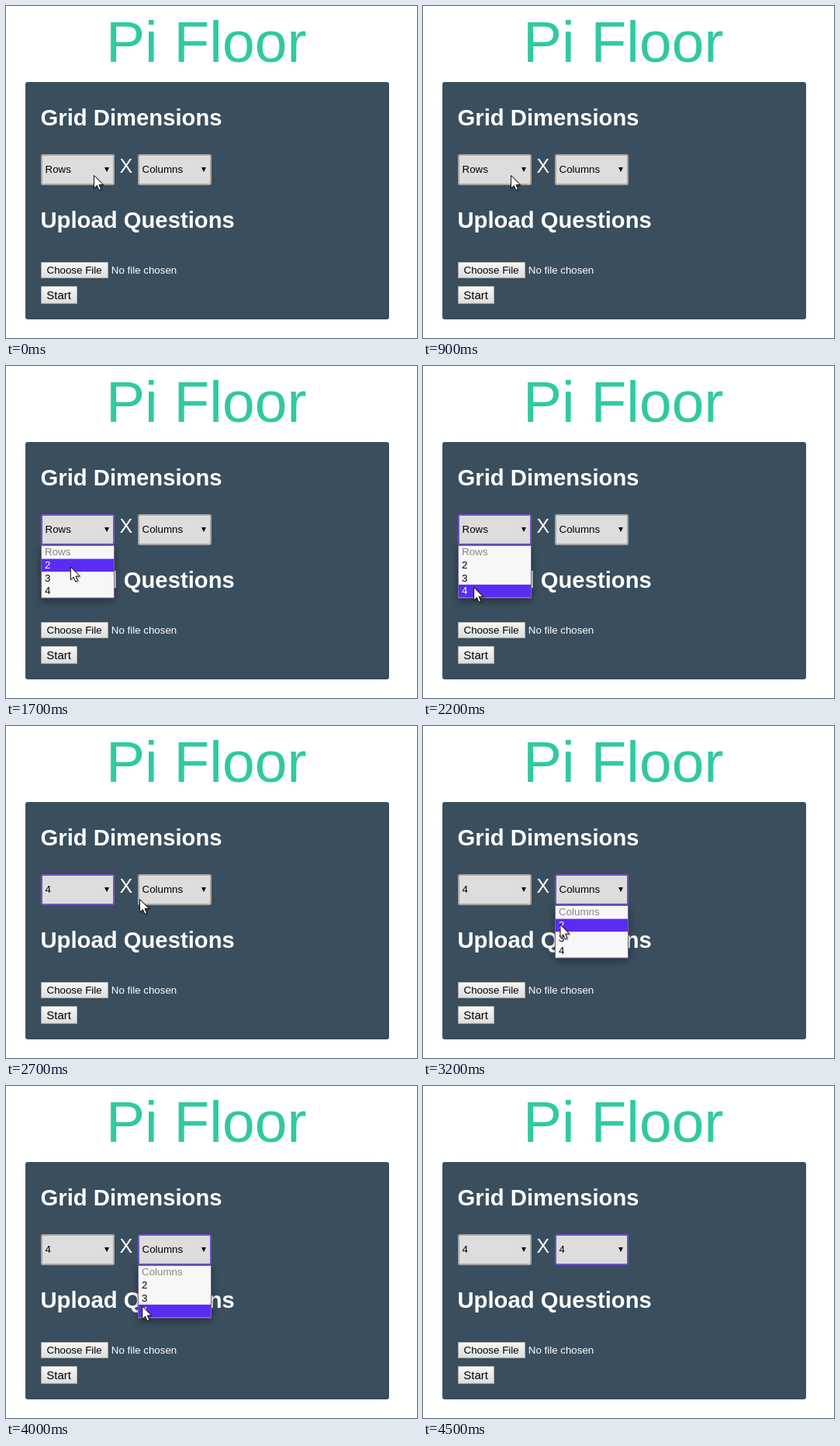
An HTML page that plays this animation: 530 by 428 pixels, repeating every 4900 ms.

```html
<!DOCTYPE html>
<html lang="en">
<head>
<meta charset="utf-8">
<title>Pi Floor</title>
<style>
html, body { margin: 0; width: 100%; height: 100%; overflow: hidden; background: #fff; }
svg { display: block; font: 13.33px "Liberation Sans", Arial, sans-serif; }
.title { font-size: 75px; fill: #30c9a0; }
.head { font-size: 29.25px; font-weight: bold; fill: #fff; }
.light { fill: #fff; }
.box { fill: #ddd; stroke: #a6a6a6; stroke-width: 2; }
.focus .box { stroke: #7253c4; }
.button { fill: url(#shade); stroke: #a9a9a9; }
.list { fill: #f7f7f7; stroke: #75669c; }
.menu { filter: drop-shadow(0 3px 5px rgba(0, 0, 0, .4)); }
</style>
</head>
<body>
<svg width="530" height="428" viewBox="0 0 530 428">
  <defs>
    <linearGradient id="shade" x2="0" y2="1">
      <stop stop-color="#f8f8f8"/><stop offset="1" stop-color="#dcdcdc"/>
    </linearGradient>
  </defs>
  <text class="title" x="129" y="72">Pi Floor</text>
  <rect x="25" y="98" width="469" height="306" rx="3" fill="#3a4e5d"/>
  <text class="head" x="44.5" y="154">Grid Dimensions</text>
  <text class="light" x="146.5" y="215" font-size="25">X</text>
  <text class="head" x="44.5" y="286">Upload Questions</text>
  <rect class="button" x="45.5" y="330.5" width="86" height="20"/>
  <text x="52.5" y="345">Choose File</text>
  <text class="light" x="135.8" y="345">No file chosen</text>
  <rect class="button" x="45.5" y="361.5" width="46" height="22"/>
  <text x="52.3" y="378" font-size="15">Start</text>
  <g id="selects"></g>
  <path id="cursor" d="M0 0V16.5l3.8-3.6 2.6 6 2.7-1.1-2.6-5.8h5.4z" fill="#fff" stroke="#111" stroke-linejoin="round"
    style="filter:drop-shadow(1px 1px 1px rgba(0,0,0,.35))"/>
</svg>
<script>
const LOOP = 4900, STEP = 100, ROW = 16.6, TOP = 232;
const selects = [
  { x: 45, name: 'Rows', open: 1100, close: 2400, blur: 2900 },
  { x: 170, name: 'Columns', open: 2900, close: 4100, blur: LOOP }
];
// time, x, y of the pointer tip
const path = [
  [0, 113.5, 218.5], [1000, 113.5, 218.5], [1100, 114.5, 213], [1300, 114.5, 213],
  [1600, 92, 246], [1900, 66, 285], [2300, 65.5, 285.5], [2400, 72, 280],
  [2700, 172.5, 223.5], [2900, 178, 216], [3200, 177, 256], [3600, 174, 275],
  [3800, 175, 284], [4300, 177, 284], [4400, 253, 346]
];

const pointer = t => {
  const i = path.findIndex(p => p[0] >= t);
  if (i < 1) return path[0].slice(1);
  const [a, b] = [path[i - 1], path[i]], k = (t - a[0]) / (b[0] - a[0]);
  return [1, 2].map(n => a[n] + (b[n] - a[n]) * k);
};

const text = (x, y, label, fill = '#000') => `<text x="${x}" y="${y}" fill="${fill}">${label}</text>`;

function menu({ x, name }, tipY) {
  const hover = Math.max(0, Math.min(3, Math.floor((tipY - TOP) / ROW)));
  const items = [name, 2, 3, 4].map((label, i) => {
    const y = TOP + i * ROW, on = i === hover;
    const bar = i ? '#5a2cf4' : '#c8c8c8';
    // the disabled first row is shaded only while the pointer is over the box itself
    const shown = on && (i || tipY < TOP);
    return (shown ? `<rect x="${x + 1}" y="${y}" width="93" height="${ROW}" fill="${bar}"/>` : '') +
      text(x + 5, y + 12.3, label, i ? (on ? '#fff' : '#000') : '#868686');
  });
  return `<g class="menu"><rect class="list" x="${x + .5}" y="231.5" width="94" height="67.5"/>${items.join('')}</g>`;
}

function select(s, t, tipY) {
  const { x, name, open, close, blur } = s;
  return `<g class="${t >= open && t < blur ? 'focus' : ''}">
    <rect class="box" x="${x + 1}" y="192" width="93" height="38" rx="1.5"/>
    ${text(x + 5.5, 215, t >= close ? 4 : name)}
    <path d="M${x + 82} 208h6l-3 6z"/></g>` + (t >= open && t < close ? menu(s, tipY) : '');
}

const box = document.getElementById('selects'), cursor = document.getElementById('cursor');
let last = -1;

function draw(now) {
  const t = Math.floor(now % LOOP / STEP) * STEP;
  if (t !== last) {
    last = t;
    const gone = t > 4400, [x, y] = pointer(Math.min(t, 4400));
    box.innerHTML = selects.map(s => select(s, t, y)).join('');
    cursor.setAttribute('transform', `translate(${x} ${y})`);
    cursor.setAttribute('visibility', gone ? 'hidden' : 'visible');
  }
}

const start = performance.now();
function tick() {
  draw(performance.now() - start);
  requestAnimationFrame(tick);
}
tick();
</script>
</body>
</html>
```
